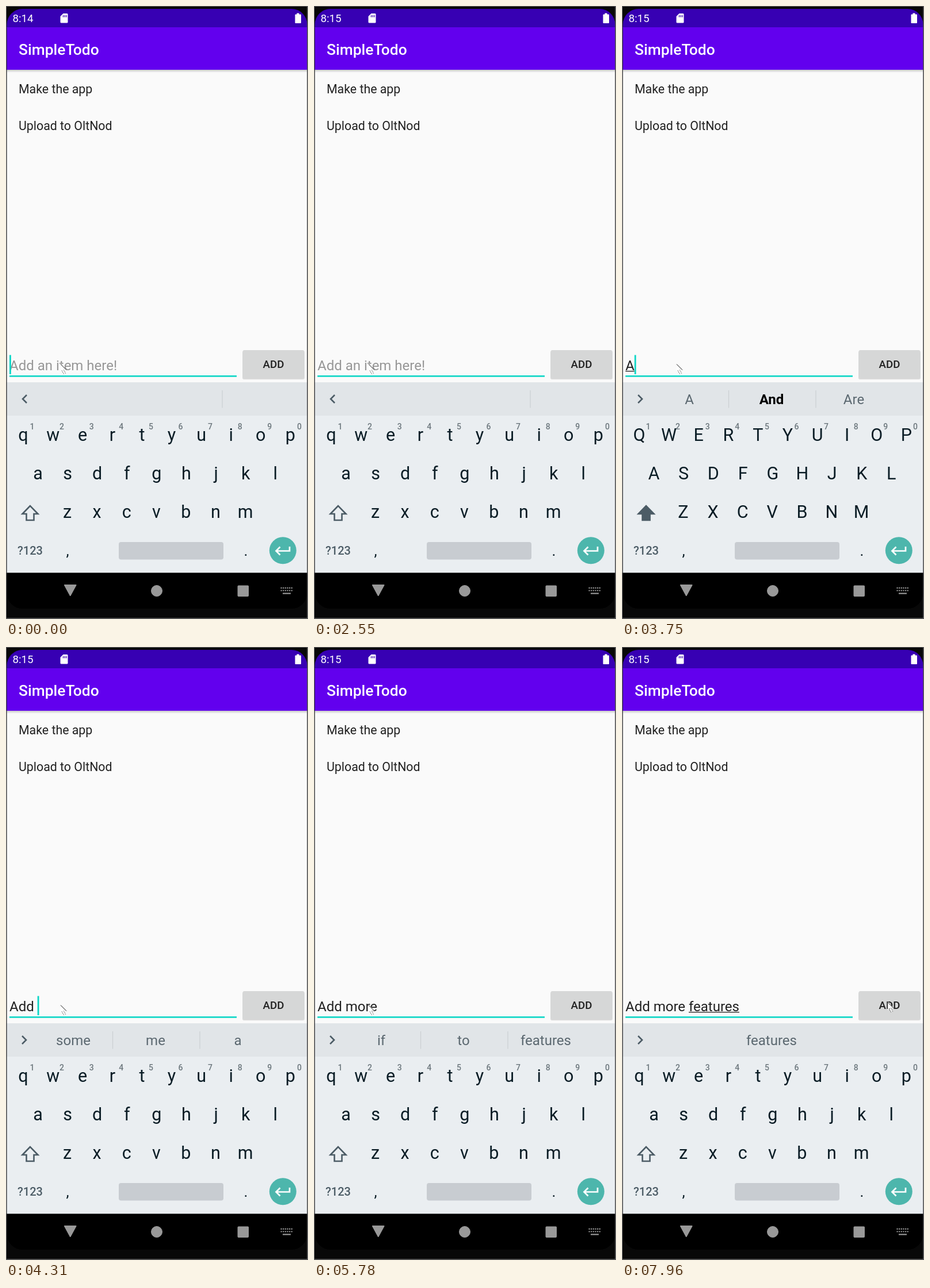
Recreate the animation shown at these times as an HTML page. Size 525 by 1067 pixels, loop 8 s.

```html
<!DOCTYPE html>
<html lang="en">
<head>
<meta charset="utf-8">
<title>Todo list</title>
<style>
html, body { margin: 0; width: 100%; height: 100%; overflow: hidden; background: #080808; }
svg { display: block; width: 100%; height: 100%; }
text { font-family: Roboto, sans-serif; white-space: pre; }
.mid { text-anchor: middle; }
.line { fill: none; stroke: #4c5c66; stroke-width: 2.6; }
.item { font-size: 21.33px; fill: #212121; }
.key { font-size: 30.5px; fill: #0a1c25; }
.num { font-size: 14px; font-weight: 500; fill: #6c777d; }
.tip { font-size: 24px; fill: #5b6870; }
.bold { font-weight: 700; fill: #000; }
</style>
</head>
<body>
<svg viewBox="0 0 525 1067">
  <defs>
    <clipPath id="screen"><rect x="1.5" y="5" width="522" height="1044" rx="27"/></clipPath>
    <linearGradient id="shade" x2="0" y2="1">
      <stop stop-color="#000" stop-opacity=".2"/><stop offset="1" stop-color="#000" stop-opacity="0"/>
    </linearGradient>
  </defs>
  <rect width="525" height="1067" fill="#080808"/>
  <g clip-path="url(#screen)">
    <rect y="5" width="525" height="1044"/>
    <rect y="5" width="525" height="33" fill="#3700b3"/>
    <rect y="37" width="525" height="74" fill="#6200ee"/>
    <rect y="111" width="525" height="544" fill="#fafafa"/>
    <rect y="111" width="525" height="5" fill="url(#shade)"/>
    <rect y="655" width="525" height="58" fill="#e1e5e8"/>
    <rect y="713" width="525" height="273.5" fill="#eaeef1"/>
  </g>
  <path d="M.5 1067V.5H524" fill="none" stroke="#686868"/>
  <path d="M524.3 0V1066H0" fill="none" stroke="#686868" stroke-width="1.6"/>

  <text id="clock" x="11.5" y="28" font-size="18.7" fill="#fff"></text>
  <path d="M99.500 13H106q1.500 0 1.500 1.500V28q0 1.500-1.500 1.500H96q-1.500 0-1.500-1.500V18z" fill="#fff"/>
  <path d="M99.500 16v3.500M102.300 16v3.500M105 16v3.500" stroke="#3700b3" stroke-width="1.300"/>
  <path d="M505.500 12.500h4v2h2.500q1 0 1 1V29q0 1-1 1h-8.500q-1 0-1-1V15.500q0-1 1-1h2z" fill="#fff"/>

  <text x="22" y="84.500" font-size="26.400" font-weight="500" fill="#fff">SimpleTodo</text>
  <text class="item" x="22" y="152">Make the app</text>
  <text class="item" x="22" y="216">Upload to OltNod</text>

  <rect x="411" y="600.500" width="108" height="49.500" rx="3" fill="#000" opacity=".13"/>
  <rect x="411.500" y="599" width="107" height="49" rx="2.700" fill="#d6d7d7"/>
  <text class="mid" x="465" y="630" font-size="18.700" font-weight="500" fill="#212121">ADD</text>
  <text id="entry" x="6" y="633.500" font-size="24"></text>
  <rect id="under" y="635" height="1.300" fill="#212121"/>
  <rect x="6" y="643" width="395" height="2.600" fill="#0bd6c6"/>
  <rect id="caret" y="607.500" width="2.800" height="33.500" fill="#0bd6c6"/>

  <path id="chevron" class="line"/>
  <path id="bars" stroke="#cacfd2" stroke-width="1.200"/>
  <g id="tips"></g>
  <g id="keys"></g>
  <path id="shift" class="line" d="M42 870L28.500 884H35.500V895H48.500V884H55.500z"/>
  <text class="mid" x="42" y="955" font-size="20" font-weight="500" fill="#4c5c66">?123</text>
  <text class="mid key" x="107" y="957" style="font-size:26px">,</text>
  <text class="mid key" x="417" y="957" style="font-size:26px">.</text>
  <rect x="196" y="933" width="182" height="30.500" rx="4" fill="#c8ccd1"/>
  <circle cx="481.300" cy="947.800" r="23.500" fill="#4db6ac"/>
  <path d="M493 941V948.500H470M476.500 941.500L469.500 948.500L476.500 955.500" fill="none" stroke="#fff" stroke-width="2.700"/>

  <g fill="#999" stroke="#999">
    <path d="M102 1008H121.500L111.700 1026z" stroke-width="2" stroke-linejoin="round"/>
    <circle cx="262" cy="1018" r="9.500"/>
    <rect x="403" y="1009" width="18.500" height="18.500" rx="1"/>
    <path d="M477.500 1013H498M477.500 1017.500H498" stroke-width="2.200" stroke-dasharray="2.200 1.430"/>
    <path d="M481 1022.500H495" stroke-width="2.200"/>
  </g>

  <g id="mouse">
    <path d="M0 0V15L3.500 12L6 18L8.500 17L6 11.500H10.500z" fill="#fff"/>
    <path d="M0 1.500L10 11.500" stroke="#111" fill="none"/>
    <path d="M2 12.500L5.500 18.500M5.500 11.500L8.500 17.500" stroke="#222" fill="none" stroke-dasharray="1.300 1.500"/>
  </g>
</svg>
<script>
const LOOP = 8000;
const $ = id => document.getElementById(id);
const show = (el, on) => el.setAttribute("visibility", on ? "visible" : "hidden");
const set = (el, values) => { for (const k in values) el.setAttribute(k, values[k]); };

function label(parent, cls, x, y, str = "") {
  const el = document.createElementNS("http://www.w3.org/2000/svg", "text");
  set(el, { class: "mid " + cls, x, y });
  el.textContent = str;
  return parent.appendChild(el);
}

// Keyboard
const STEP = 51.6;
const letters = [["qwertyuiop", 30, 757], ["asdfghjkl", 55.5, 824], ["zxcvbnm", 106.5, 891]]
  .flatMap(([row, x, y]) => [...row].map((c, i) => label($("keys"), "key", x + i * STEP, y, c)));
[..."1234567890"].forEach((c, i) => label($("keys"), "num", 45.5 + i * STEP, 736.5, c));
const tips = [117, 260, 403].map(x => label($("tips"), "tip", x, 693));

// Time, typed text, suggestions (* marks the bold one)
const typing = [
  [0, "", ""],
  [3740, "A", "A,*And,Are"],
  [4020, "Ad", "Ad,*Add,And"],
  [4160, "Add", "Add,*Add,Added"],
  [4310, "Add ", "some,me,a"],
  [5040, "Add mo", "mo,*more,most"],
  [5190, "Add more", "more,*more,moreover"],
  [5340, "Add more ", "if,to,features"],
  [5940, "Add more f", "f,*for,from"],
  [6240, "Add more fe", "fe,*feel,features"],
  [6390, "Add more fea", "fea,*features,feature"],
  [6540, "Add more feat", "feat,*features,feature"],
  [6830, "Add more feature", "feature,*features,"],
  [7130, "Add more features", ",features,"]
];
const blinks = [430, 1050, 1500, 1940, 2550, 2980, 3450, 3740, 4760, 5040, 5780, 5940, 7570];
const moves = [[0, 95, 622], [7700, 170, 621], [7830, 360, 618], [7960, 462, 617]];
const at = (list, t) => list.filter(s => s[0] <= t).pop();

function draw(t) {
  const [, str, words] = at(typing, t);
  const entry = $("entry");
  $("clock").textContent = t < 580 ? "8:14" : "8:15";

  entry.textContent = str || "Add an item here!";
  entry.setAttribute("fill", str ? "#212121" : "#979797");
  const widthTo = n => n ? entry.getSubStringLength(0, n) : 0;
  const end = widthTo(str.length), start = widthTo(str.lastIndexOf(" ") + 1);
  set($("under"), { x: 6 + start, width: Math.max(0, end - start) });
  $("caret").setAttribute("x", 6 + end);
  show($("caret"), blinks.filter(b => b <= t).length % 2 === 0);

  const list = words.split(",");
  tips.forEach((el, i) => {
    const word = list[i] || "", bold = word[0] === "*";
    el.textContent = bold ? word.slice(1) : word;
    el.classList.toggle("bold", bold);
  });
  const bars = !str ? [376] : list[0] ? [185.5, 337] : [];
  $("bars").setAttribute("d", bars.map(x => `M${x} 669V699.5`).join(""));
  $("chevron").setAttribute("d", str ? "M28 677L35 684L28 691" : "M36 677L29 684L36 691");

  const caps = t >= 3600 && t < 3890;
  letters.forEach(el => {
    const c = el.textContent;
    el.textContent = caps ? c.toUpperCase() : c.toLowerCase();
  });
  $("shift").style.fill = caps ? "#4c5c66" : "none";

  const [, x, y] = at(moves, t);
  $("mouse").setAttribute("transform", `translate(${x} ${y})`);
}

function tick() {
  draw(performance.now() % LOOP);
  requestAnimationFrame(tick);
}
tick();
</script>
</body>
</html>
```
